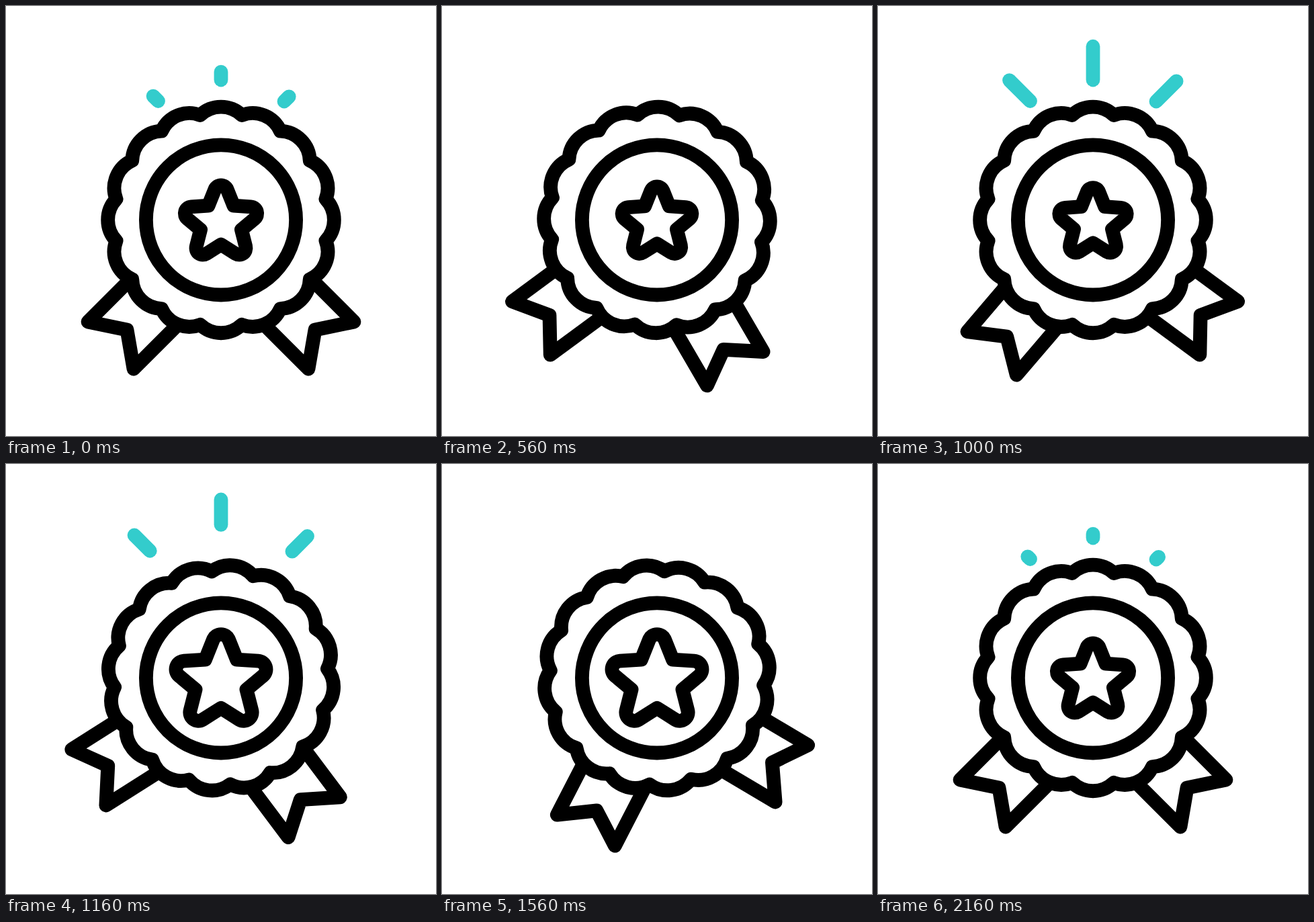
An HTML page that plays this animation: 640 by 640 pixels, repeating every 2.2 s.

```html
<!DOCTYPE html>
<html lang="en">
<head>
<meta charset="utf-8">
<title>Award badge</title>
<style>
  html, body { margin: 0; width: 100%; height: 100%; overflow: hidden; background: #fff; }
  svg { display: block; width: 100%; height: 100%; }
  path, circle { fill: #fff; stroke: #000; stroke-width: 20.8; stroke-linecap: round; stroke-linejoin: round; }
  .ray { stroke: #33cccc; fill: none; }
</style>
</head>
<body>
<svg viewBox="0 0 640 640">
  <path id="left" d="M222 370L122 470L180 482L190 540L295 435"/>
  <path id="right" d="M418 370L518 470L460 482L450 540L345 435"/>
  <path id="edge"/>
  <circle cx="320" cy="318.4" r="111.6"/>
  <path id="star"/>
  <path id="rayLeft" class="ray"/>
  <path id="rayTop" class="ray"/>
  <path id="rayRight" class="ray"/>
</svg>
<script>
const LOOP = 2200, STEP = 40, BEAT = 400;
const CX = 320, CY = 318.4;
const $ = id => document.getElementById(id);
const rad = deg => deg * Math.PI / 180;
const ease = u => (1 - Math.cos(Math.PI * Math.min(1, Math.max(0, u)))) / 2;
const mix = (a, b, u) => a + (b - a) * u;
const polar = (cx, cy, r, deg) => [cx + r * Math.sin(rad(deg)), cy - r * Math.cos(rad(deg))];
const fmt = p => p.map(v => v.toFixed(2)).join(' ');

// Starts and ends at rest, reaching one peak per beat
function swing(t, peaks) {
  return [...peaks, 0].reduce((angle, peak, i) => mix(angle, peak, ease(t / BEAT - i)), 0);
}

// Pulses once per beat with growing strength, then settles
function pulse(t) {
  if (t > 4 * BEAT) return mix(1.28, 1, ease(t / BEAT - 4));
  const low = 1 - .065 * ease(2 * t / BEAT);
  const wave = (1 + Math.cos(2 * Math.PI * t / BEAT)) / 2;
  return low + .345 * Math.min(1, t / 600) * wave;
}

function edgePath(bumps = 16, radius = 159) {
  const at = i => fmt(polar(CX, CY, radius, (i - .5) * 360 / bumps));
  let d = 'M' + at(0);
  for (let i = 1; i <= bumps; i++) d += 'A45 45 0 0 1 ' + at(i);
  return d + 'Z';
}

// Five round tips joined by tangents to the inner corners
function starPath(s) {
  const cy = 321.5 + 1.5 * s, inner = 32 * s, tip = 46 * s, r = 10 * s;
  const [dx, y0] = polar(0, 0, inner, 36), dy = y0 + tip;
  const normal = (Math.atan2(dx, -dy) - Math.acos(r / Math.hypot(dx, dy))) * 180 / Math.PI;
  let d = '';
  for (let a = 0; a < 360; a += 72) {
    const [x, y] = polar(CX, cy, tip, a);
    d += (d ? 'L' : 'M') + fmt(polar(x, y, r, a - normal));
    d += `A${r} ${r} 0 0 1 ` + fmt(polar(x, y, r, a + normal));
    d += 'L' + fmt(polar(CX, cy, inner, a + 36));
  }
  return d + 'Z';
}

function drawRays(t) {
  const age = (t - 670) % 1400;
  const head = ease(age / 430), tail = ease((age - 330) / BEAT);
  const ray = (id, x, y, dx, dy) => {
    const at = p => fmt([x + dx * p, y + dy * p]);
    $(id).setAttribute('d', head - tail > .005 ? `M${at(tail)}L${at(head)}` : '');
  };
  ray('rayLeft', 226.5, 141.5, -35.5, -35.5);
  ray('rayTop', 320, 110, 0, -57);
  ray('rayRight', 414, 142, 34.5, -34.5);
}

function draw(t) {
  const turn = (id, angle, x, y) => $(id).setAttribute('transform', `rotate(${angle} ${x} ${y})`);
  // The rosette leads the left ribbon and the right ribbon lags behind it
  turn('edge', swing(t + STEP, [13.5, -12, 6.3, -7.3]), CX, CY);
  turn('left', swing(t, [25, -22.5, 13.5, -18.5]), 314, 338);
  turn('right', swing(t - STEP, [23.5, -19, 11, -17]), 326, 338);
  $('star').setAttribute('d', starPath(pulse(t)));
  drawRays(t);
}

$('edge').setAttribute('d', edgePath());

const start = performance.now();
function tick() {
  const t = (performance.now() - start) % LOOP;
  // The loop opens on its closing pose
  draw(Math.floor(t / STEP) * STEP || LOOP);
  requestAnimationFrame(tick);
}
tick();
</script>
</body>
</html>
```
